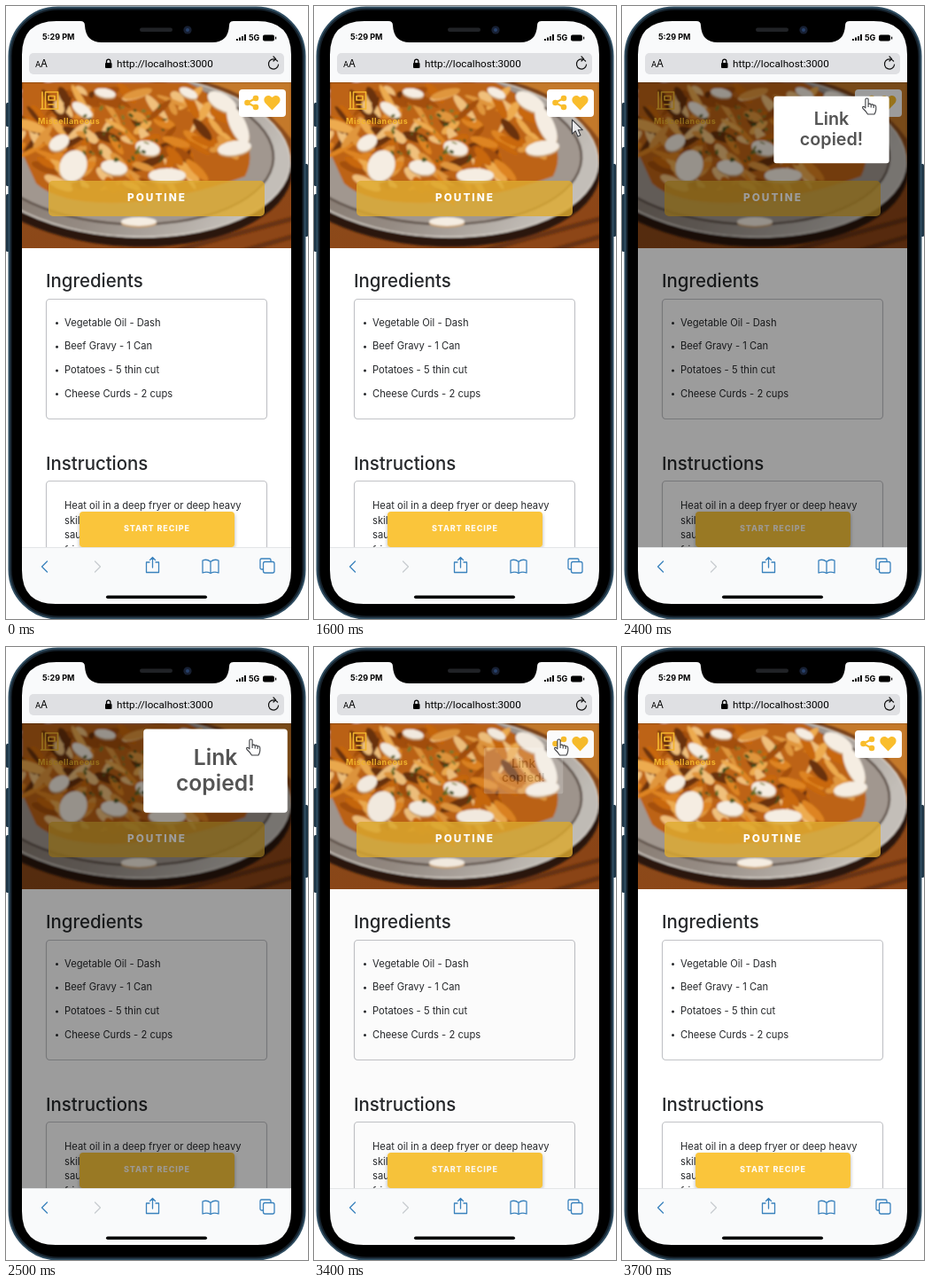
Animation, 341 px wide and 691 px high, one loop 4700 ms. Source, as an HTML page:

```html
<!DOCTYPE html>
<html lang="en">
<head>
<meta charset="utf-8">
<title>Recipe share</title>
<style>
  html, body { margin: 0; width: 100%; height: 100%; overflow: hidden; background: #fff; }
  svg { display: block; width: 341px; height: 691px; font-family: Inter, sans-serif; }
  .line { fill: none; stroke-linecap: round; stroke-linejoin: round; }
  .blue { stroke: #3a82bd; stroke-width: 1.3; }
  .gold { fill: #f9bd2c; }
  .h { font-size: 20.4px; font-weight: 500; fill: #26282b; }
  .p { font-size: 11.2px; fill: #26282b; }
  .box { fill: none; stroke: #c2c3c7; stroke-width: 1.2; }
</style>
</head>
<body>
<svg viewBox="0 0 341 691">
  <defs>
    <linearGradient id="table" x2=".4" y2="1">
      <stop offset="0" stop-color="#5a2c10"/><stop offset=".5" stop-color="#8a4c1c"/>
      <stop offset="1" stop-color="#8d4617"/>
    </linearGradient>
    <linearGradient id="plate" x2="1" y2=".3">
      <stop offset="0" stop-color="#75675c"/><stop offset=".6" stop-color="#958b83"/>
      <stop offset="1" stop-color="#c3beb8"/>
    </linearGradient>
    <filter id="soft"><feGaussianBlur stdDeviation="1.1"/></filter>
    <filter id="shadow" x="-10%" y="-20%" width="120%" height="160%">
      <feDropShadow dx="0" dy="2" stdDeviation="2" flood-opacity=".3"/>
    </filter>
    <clipPath id="photo"><rect x="18" y="86" width="304" height="187"/></clipPath>
    <clipPath id="page"><rect x="18" y="86" width="304" height="524"/></clipPath>
  </defs>

  <!-- phone -->
  <g fill="#1d3546">
    <rect x="0" y="109" width="5" height="27" rx="1.5"/>
    <rect x="0" y="159" width="5" height="44" rx="1.5"/>
    <rect x="0" y="212" width="5" height="65" rx="1.5"/>
    <rect x="336" y="178" width="5" height="82" rx="1.5"/>
  </g>
  <rect x="3.5" y="1.5" width="334" height="689" rx="55" fill="#16232e" stroke="#304e62" stroke-width="2"/>
  <rect x="6.5" y="4.5" width="328" height="683" rx="52"/>
  <path fill="#f9fafb" d="M57 17H84Q89 17 89 22Q90 41 108 41H233Q251 41 252 22Q252 17 257 17H284Q322 17 322 55V636Q322 674 284 674H56Q18 674 18 636V55Q18 17 57 17Z"/>
  <rect x="151" y="24.5" width="37" height="4.5" rx="2.2" fill="#202226"/>
  <circle cx="205" cy="27" r="4.6" fill="#172033"/><circle cx="205" cy="27" r="2" fill="#27406b"/>

  <!-- status and address bars -->
  <g font-size="9" font-weight="700"><text x="41" y="38">5:29 PM</text><text x="274" y="39">5G</text></g>
  <path d="M260 37h2v2h-2zM263 35.5h2v3.5h-2zM266 34h2v5h-2zM269 32h2v7h-2z"/>
  <rect x="290" y="32.5" width="13" height="7" rx="2"/><rect x="304" y="34.5" width="1.2" height="3" rx=".6"/>
  <rect x="26" y="53" width="288" height="24" rx="5" fill="#dfe0e3"/>
  <text x="33" y="69" font-size="9">A</text><text x="39" y="69" font-size="11.5">A</text>
  <rect x="112" y="64" width="7.5" height="6" rx="1"/>
  <path class="line" stroke="#000" stroke-width="1.3" d="M113.5 64V62.5a2.2 2.4 0 0 1 4.4 0V64"/>
  <text x="125" y="69" font-size="11.7" font-family="Roboto, sans-serif">http://localhost:3000</text>
  <path class="line" stroke="#111" stroke-width="1.2" d="M306.6 62.2A5.6 5.6 0 1 0 307.6 66M302 57l2.6 2.6L302 62"/>

  <!-- page -->
  <g clip-path="url(#page)">
    <rect x="18" y="86" width="304" height="524" fill="#fff"/>
    <g clip-path="url(#photo)">
      <rect x="18" y="86" width="304" height="187" fill="url(#table)"/>
      <g filter="url(#soft)">
        <path fill="#c4792b" d="M225 86H322V150Q285 100 225 86Z"/>
        <path class="line" stroke="#4f260d" stroke-width="5" opacity=".6" d="M190 276L330 238M240 284L330 258"/>
        <g transform="rotate(3 140 168)">
          <ellipse cx="140" cy="178" rx="184" ry="93" fill="#2b170c"/>
          <ellipse cx="140" cy="168" rx="181" ry="92" fill="url(#plate)" stroke="#d8d2ca" stroke-width="1.6"/>
          <ellipse cx="136" cy="164" rx="166" ry="82" fill="#a1978f" stroke="#5e5149" stroke-width="2.5"/>
        </g>
        <path fill="#bd6414" d="M18 86H205Q245 105 262 135Q284 165 270 192Q200 218 130 222Q60 224 34 200L18 165Z"/>
        <g id="food"></g>
      </g>
    </g>
    <g class="line" stroke="#f3b52e" stroke-width="1.7">
      <path d="M44.500 97H58.500V116H44.500ZM41 97V116M48 101.500H55V106H48ZM48 111H54M39.500 116H44"/>
    </g>
    <text x="36" y="133" font-size="9" font-weight="700" letter-spacing=".5" fill="#f3b52e">Miscellaneous</text>
    <rect x="263" y="94" width="53" height="31" rx="4" fill="#fff"/>
    <g class="gold">
      <path class="line" stroke="#f9bd2c" stroke-width="2" d="M282 104L272.5 109L282 114"/>
      <circle cx="282" cy="104" r="3.3"/><circle cx="272.5" cy="109" r="3.3"/><circle cx="282" cy="114" r="3.3"/>
      <path d="M300.5 117.5L292.8 109.5C288.5 104 295 97.5 300.5 103C306 97.5 312.5 104 308.2 109.5Z"/>
    </g>
    <rect x="48" y="197" width="244" height="40" rx="5" fill="#dfab30" opacity=".82"/>
    <text x="137" y="220" font-size="11.8" font-weight="800" letter-spacing="2" fill="#fff">POUTINE</text>

    <text class="h" x="45" y="317">Ingredients</text>
    <rect class="box" x="45.5" y="330.5" width="249" height="135" rx="4"/>
    <g id="list"></g>
    <text class="h" x="45" y="523">Instructions</text>
    <rect class="box" x="45.5" y="535.5" width="249" height="135" rx="4"/>
    <g id="steps"></g>
    <rect x="83" y="570" width="175" height="40" rx="4" fill="#fac53a" filter="url(#shadow)"/>
    <text x="133" y="592" font-size="9" font-weight="800" letter-spacing=".9" fill="#fffaf0">START RECIPE</text>
    <rect id="dim" x="18" y="86" width="304" height="524"/>
  </g>

  <g id="popup">
    <rect x="-78.5" y="-45.5" width="157" height="91" rx="3.5" fill="#fff"/>
    <g font-size="23.8" font-weight="600" fill="#545454" text-anchor="middle">
      <text y="-6.5">Link</text><text y="21.5">copied!</text>
    </g>
  </g>

  <!-- bottom bar -->
  <path d="M18 610.5H322" stroke="#e3e5e7"/>
  <g class="line blue">
    <path d="M46.5 626L40.5 632L46.5 638"/>
    <path stroke="#c8ccd0" d="M100.5 626L106.5 632L100.5 638"/>
    <path d="M162 627h-3.5v11.500h14v-11.500H169M165.5 633v-11.500M162.5 624.500l3-3l3 3"/>
    <path d="M231 626.5Q227 623 222 625V639Q227 637 231 639.5Q235 637 240 639V625Q235 623 231 626.5V639.5"/>
    <rect x="290.5" y="626.5" width="12.5" height="12.5" rx="2"/>
    <path d="M290 635h-1.5q-1.5 0-1.5-1.5v-9q0-1.5 1.5-1.5h9q1.5 0 1.5 1.5v1.5"/>
  </g>
  <rect x="113" y="664.5" width="114" height="3.6" rx="1.8"/>

  <g stroke="#3c3e42" stroke-width="1.1" stroke-linejoin="round">
    <path id="arrow" fill="#e8e8ea" d="M0 0V16L3.8 12.7L6.5 19L9.5 17.7L6.8 11.6H11.8Z"/>
    <path id="hand" fill="#fff" d="M-1.6 11V1.5Q-1.6 0 0 0T1.6 1.5V6.5Q3.5 5.5 4.7 7.2Q6.6 6.3 7.6 8Q10.3 7.3 10.3 10V13Q10 15.5 8.5 18H1Q-1 14.5-4.5 11.5Q-5.5 9.5-3.7 9.3Q-2.7 9.6-1.6 11ZM1.6 6.5V10M4.7 7.2V10.5M7.6 8V11"/>
  </g>
</svg>
<script>
const $ = id => document.getElementById(id);
const LOOP = 4700, STEP = 100;

// food on the plate
let seed = 7;
const rnd = (a, b) => a + (b - a) * ((seed = seed * 16807 % 2147483647) / 2147483647);
const pick = list => list[Math.floor(rnd(0, list.length))];
const blob = (x, y, rx, ry, turn, fill) =>
  `<ellipse cx="${x}" cy="${y}" rx="${rx}" ry="${ry}" fill="${fill}" transform="rotate(${turn} ${x} ${y})"/>`;

let food = "";
for (let i = 0; i < 130; i++) {
  const a = rnd(0, 2 * Math.PI), r = Math.sqrt(rnd(0, 1));
  food += blob(135 + 122 * r * Math.cos(a), 152 + 62 * r * Math.sin(a), rnd(8, 21), rnd(2.5, 6),
    rnd(15, 65) * (rnd(0, 1) < .35 ? -1 : 1),
    pick(["#de8420", "#c9680d", "#edab50", "#a4500c", "#6b3009", "#e0963c", "#f0c07c"]));
}
const curds = [
  [76, 180, 15, 18, 25], [86, 117, 13, 6, 35], [112, 98, 12, 5, 10], [60, 154, 12, 8, -30],
  [182, 191, 21, 8, 0], [160, 160, 14, 8, 15], [244, 108, 18, 9, 30], [262, 134, 9, 23, -25],
  [258, 160, 19, 8, -8], [122, 182, 15, 8, 10], [150, 243, 20, 5, 0], [206, 98, 11, 5, 25]
];
for (const [x, y, rx, ry, turn] of curds)
  food += blob(x, y + 2, rx, ry, turn, "#c9a172") + blob(x, y, rx, ry, turn, "#f5ede2");
for (let i = 0; i < 50; i++)
  food += blob(rnd(85, 180), rnd(112, 176), rnd(1.2, 3.5), rnd(.8, 2), rnd(0, 180), pick(["#566022", "#3f4f1c", "#7c7a2c"]));
$("food").innerHTML = food;

const line = (s, y) => `<text class="p" x="66" y="${y}">${s}</text>`;
$("list").innerHTML = ["Vegetable Oil - Dash", "Beef Gravy - 1 Can", "Potatoes - 5 thin cut", "Cheese Curds - 2 cups"]
  .map((s, i) => line(s, 360.5 + i * 26.7) + `<circle cx="57.5" cy="${357.5 + i * 26.7}" r="1.5" fill="#26282b"/>`).join("");
$("steps").innerHTML = ["Heat oil in a deep fryer or deep heavy", "skillet to 365 F. Warm some gravy in",
  "saucepan or microwave. Place the", "fries in the hot oil and cook until"]
  .map((s, i) => line(s, 567 + i * 16.5)).join("");

const show = (el, on) => el.setAttribute("visibility", on ? "visible" : "hidden");
const mix = (a, b, u) => a + (b - a) * Math.min(1, Math.max(0, u));

// pop in with a small bounce
function popScale(ms) {
  if (ms < 135) return mix(.7, 1.05, ms / 135);
  if (ms < 240) return mix(1.05, .95, (ms - 135) / 105);
  return mix(.95, 1, (ms - 240) / 60);
}

function draw() {
  const t = Math.floor(performance.now() % LOOP / STEP) * STEP;

  const u = mix(0, 1, (t - 1400) / 500), go = 1 - (1 - u) ** 2;
  const x = mix(318, 276.5, go), y = mix(171, 104, go);
  const live = t >= 1400 && t < 3700, over = y < 124;
  for (const [id, on] of [["arrow", !over], ["hand", over]]) {
    $(id).setAttribute("transform", `translate(${x} ${y})`);
    show($(id), live && on);
  }

  const open = t >= 2400 && t < 3400, fading = t >= 3400 && t < 3500;
  const scale = open ? popScale(t - 2350) : .57;
  $("dim").setAttribute("opacity", open ? .39 : fading ? .015 : 0);
  $("popup").setAttribute("opacity", open ? 1 : .2);
  $("popup").setAttribute("transform", `translate(236.5 139.5) scale(${scale})`);
  show($("popup"), open || fading);

  requestAnimationFrame(draw);
}
draw();
</script>
</body>
</html>
```
